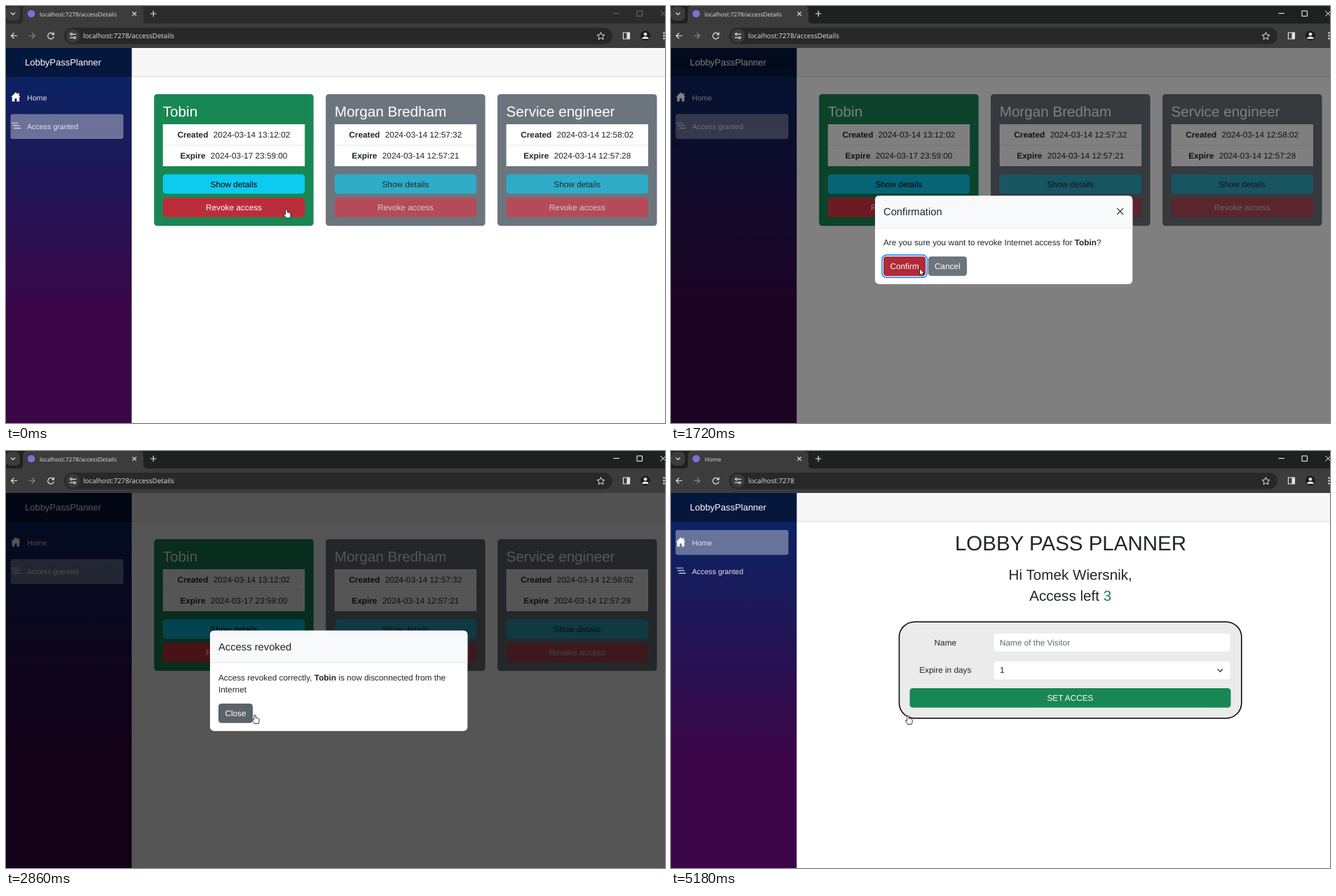
Recreate the animation shown at these times as an HTML page. Size 940 by 596 pixels, loop 5710 ms.

```html
<!DOCTYPE html>
<html lang="en">
<head>
<meta charset="utf-8">
<title>Access details</title>
<style>
  html, body { margin: 0; width: 100%; height: 100%; overflow: hidden; background: #fff; }
  svg { position: fixed; inset: 0; width: 100%; height: 100%; }
  text { font-family: "Liberation Sans", Arial, sans-serif; font-size: 11.8px; fill: #212529; text-rendering: geometricPrecision; white-space: pre; }
  .ui { font-family: "Open Sans", "Noto Sans", sans-serif; fill: #e8e8e8; }
  .mid { text-anchor: middle; }
  .b { font-weight: bold; }
</style>
</head>
<body>
<svg id="stage" viewBox="0 0 940 596"></svg>
<script>
const LOOP = 5710;
const GREEN = '#198754', RED = '#dc3545', GREY = '#6c757d';

// Markup helpers
const rect = (x, y, w, h, fill, r = 0, attrs = '') =>
  `<rect x="${x}" y="${y}" width="${w}" height="${h}" fill="${fill}" rx="${r}" ${attrs}/>`;
const text = (x, y, str, attrs = '', size = 11.8, fill = '#212529') =>
  `<text x="${x}" y="${y}" ${attrs} style="font-size:${size}px;fill:${fill}">${str}</text>`;
const line = (d, color, width = 1.2, attrs = '') =>
  `<path d="${d}" fill="none" stroke="${color}" stroke-width="${width}" ${attrs}/>`;
const group = (id, body, attrs = '') => `<g id="${id}" ${attrs}>${body}</g>`;
const bold = str => `<tspan class="b">${str}</tspan>`;
const button = (x, y, w, label, fill, color = '#fff', over = '') =>
  rect(x, y, w, 27.8, fill, 4.4) + over + text(x + w / 2, y + 18.2, label, 'class="mid"', 11.8, color);

function browser() {
  const white = '#e3e3e3';
  const tab = (id, title, url) => group(id,
    text(48, 14.6, title, 'class="ui"', 8.26, white) +
    text(110, 46.3, url, 'class="ui"', 9.76, white));
  return rect(0, 0, 940, 60, '#2b2b2b', 0, 'id="titlebar"') +
    rect(0, 1, 20, 20, '#3c3c3c', 7) +
    line('M7 9.5l3 3 3-3', white) +
    '<path d="M19 25q5 0 5-5V6q0-6 6-6H190q6 0 6 6V20q0 5 5 5z" fill="#3c3c3c"/>' +
    '<circle cx="36" cy="11" r="5.3" fill="#7a70d8"/>' +
    line('M180.3 8.3l5.6 5.6m0-5.6l-5.6 5.6M206 11h8.4M210.2 6.8v8.4', white) +
    line('M866.5 10.5h8.5M900 7h7.5v7.5h-7.5zM933.5 7l7.5 7.5m0-7.5l-7.5 7.5', '#707070', 1, 'id="controls"') +
    rect(0, 25, 940, 35, '#3c3c3c') +
    rect(83, 31, 782, 23.5, '#282828', 11.75) +
    line('M16 42.5H7.5m4-4l-4 4 4 4M67.3 40a4.3 4.3 0 1 0 .9 3.6M68.3 37.5v3.3h-3.3', white) +
    line('M32.5 42.5H41m-4-4l4 4-4 4', '#8a8a8a') +
    '<circle cx="95.5" cy="42.7" r="9.7" fill="#3c3c3c"/>' +
    line('M91 40.3h1.5M95.5 40.3h4.7M91 45.2h4.7M98.7 45.2h1.5', white) +
    `<g fill="none" stroke="${white}" stroke-width="1.1"><circle cx="93.3" cy="40.3" r="1.4"/><circle cx="97.7" cy="45.2" r="1.4"/></g>` +
    line('M848.5 37.5l1.6 3.6 3.9.3-3 2.6.9 3.8-3.4-2-3.4 2 .9-3.8-3-2.6 3.9-.3z', white, 1) +
    line('M880.5 38h9v9h-9z', white) + rect(885.5, 38, 4, 9, white) +
    `<circle cx="912" cy="42.5" r="7" fill="#1c1c1c"/><circle cx="912" cy="40.3" r="2.4" fill="${white}"/>` +
    `<path d="M907.3 47q0-3.2 4.7-3.2t4.7 3.2z" fill="${white}"/>` +
    [38.5, 42.5, 46.5].map(y => `<circle cx="938.5" cy="${y}" r="1.2" fill="${white}"/>`).join('') +
    tab('tabDetails', 'localhost:7278/accessDetails', 'localhost:7278/accessDetails') +
    tab('tabHome', 'Home', 'localhost:7278');
}

const navMark = y => rect(6.5, y, 161, 35.5, 'rgba(255,255,255,.37)', 3);

function frame() {
  return rect(0, 60, 940, 536, '#fff') +
    rect(179, 60, 761, 41, '#f7f7f7') + rect(179, 100.5, 761, 1, '#d6d5d5') +
    rect(0, 60, 179.3, 536, 'url(#side)') + rect(0, 60, 179.3, 41.3, 'rgba(0,0,0,.4)') +
    text(27, 85.4, 'LobbyPassPlanner', '', 12.98, '#fff');
}

function navLabels() {
  return '<path d="M13.9 123.3L7.2 130H8.7V136.6H12.4V132.3H15.4V136.6H19.1V130H20.6L18.6 128V124.5H16.8V126.2z" fill="#fff"/>' +
    line('M7.6 167.2h10M9.4 170.9h10M11.2 174.6h10', '#e4e4e4', 1.1) +
    text(30, 134.6, 'Home', '', 10.62, '#e6e6e6') +
    text(30, 175.9, 'Access granted', '', 10.62, '#e6e6e6');
}

function card(x, name, created, expire, active) {
  const row = (y, label, date) =>
    text(x + 113.7, y, `${bold(label)}<tspan dx="7.4">${date}</tspan>`, 'class="mid"');
  const hover = active ? rect(x + 12.6, 274, 202.4, 27.8, '#bb2d3b', 4.4, 'id="revokeHover"') : '';
  return rect(x, 126, 227.5, 188.3, active ? GREEN : GREY, 4.5) +
    text(x + 12.6, 158, name, '', 20.65, '#fff') +
    rect(x + 12.6, 169, 202.4, 60, '#fff') + rect(x + 12.6, 198.6, 202.4, .8, '#dee2e6') +
    row(188, 'Created', created) + row(218, 'Expire', expire) +
    `<g opacity="${active ? 1 : .65}">` +
    button(x + 12.6, 240.4, 202.4, 'Show details', '#0dcaf0', '#000') +
    button(x + 12.6, 274, 202.4, 'Revoke access', RED, '#fff', hover) + '</g>';
}

const details = () => navMark(154.4) +
  card(211.2, 'Tobin', '2024-03-14 13:12:02', '2024-03-17 23:59:00', true) +
  card(456.1, 'Morgan Bredham', '2024-03-14 12:57:32', '2024-03-14 12:57:21') +
  card(701, 'Service engineer', '2024-03-14 12:58:02', '2024-03-14 12:57:28');

function homeForm() {
  const field = y => rect(460, y, 338, 27, '#fff', 4.4, 'stroke="#dee2e6" stroke-width=".75"');
  return text(570, 142, 'LOBBY PASS PLANNER', 'class="mid"', 29.5) +
    text(569.7, 184, 'Hi Tomek Wiersnik,', 'class="mid"', 20.65) +
    text(569.7, 214, `Access left <tspan fill="${GREEN}" style="fill:${GREEN}">3</tspan>`, 'class="mid"', 20.65) +
    rect(325.5, 244.2, 488.3, 137.8, '#ebebeb', 22, 'stroke="#000" stroke-width="1.5"') +
    text(391.3, 277.5, 'Name', 'class="mid"') + text(391.3, 317.3, 'Expire in days', 'class="mid"') +
    field(260) + text(469, 277.5, 'Name of the Visitor', '', 11.8, '#62696f') +
    field(300) + text(469, 317.3, '1') +
    line('M779.8 311.8l3.6 3.6 3.6-3.6', '#343a40', 1.4) +
    button(340.5, 339, 458, 'SET ACCES', GREEN);
}

function dialog(id, y, h, title, body) {
  return group(id,
    rect(291, y, 367.3, h, '#fff', 5.9) +
    `<path d="M291 ${y + 46}v-40.1q0-5.9 5.9-5.9h355.5q5.9 0 5.9 5.9v40.1z" fill="#f8f9fa"/>` +
    rect(291, y + 45.6, 367.3, .75, '#dee2e6') +
    text(303, y + 27.8, title, '', 14.75) + body);
}

const confirmBody =
  line('M636.3 289.2l8.8 8.8m0-8.8l-8.8 8.8', '#222', 1.1) +
  text(303, 342, `Are you sure you want to revoke Internet access for ${bold('Tobin')}?`) +
  group('ring', rect(300.2, 355.1, 66, 33.6, '#258cfb', 7) + rect(301.9, 356.8, 62.6, 30.2, '#fff', 5.5)) +
  button(303, 358, 60.2, 'Confirm', RED, '#fff', rect(303, 358, 60.2, 27.8, '#b02a37', 4.4, 'id="confirmHover"')) +
  button(366.8, 358, 55.3, 'Cancel', GREY);

const revokedBody =
  text(303, 333.2, `Access revoked correctly, ${bold('Tobin')} is now disconnected from the`) +
  text(303, 350.9, 'Internet') +
  button(303, 366.7, 49, 'Close', '#5c636a');

const shade = id => rect(0, 60, 940, 536, '#000', 0, `id="${id}"`);
const loader = group('loader',
  rect(0, 60, 940, 536, 'rgba(0,0,0,.5)') +
  line('M7.35 7.35A10.4 10.4 0 1 1 7.35 -7.35', '#fff', 2.95, 'id="spinner"') +
  text(474.6, 352, 'Loading data, please wait ...', 'class="mid"', 11.8, '#fff'));

const pointer = d => `<path d="${d}" fill="#fff" stroke="#000" stroke-width=".8" stroke-linejoin="round"/>`;
const cursors =
  group('arrow', pointer('M0 0V9.6L2.2 7.6 3.7 11 5.2 10.3 3.8 7.1H6.8Z')) +
  group('hand', pointer('M-1.3 1Q0-.4 1.3 1V4.6Q2.3 4 3 4.8 4.2 4.3 4.8 5.4 6 5.3 6 6.6V9Q6 11 5 12.6H-.8Q-1.6 10.5-3.7 8.2-4 6.6-2.6 6.8L-1.3 7.8Z'));

document.getElementById('stage').innerHTML =
  '<defs><linearGradient id="side" x1="0" y1="0" x2="0" y2="1"><stop stop-color="#052767"/>' +
  '<stop offset=".7" stop-color="#3a0647"/></linearGradient></defs>' +
  browser() + frame() +
  group('details', details()) +
  group('home', navMark(113) + group('form', homeForm())) +
  navLabels() + shade('shade1') + shade('shade2') +
  dialog('confirm', 271.2, 126.2, 'Confirmation', confirmBody) +
  dialog('revoked', 262.4, 143.6, 'Access revoked', revokedBody) +
  loader + cursors;

// Timing helpers
const $ = id => document.getElementById(id);
const ramp = (t, start, len) => Math.min(1, Math.max(0, (t - start) / len));
const smooth = p => p * p * (3 - 2 * p);
const show = (id, on) => $(id).setAttribute('display', on ? 'inline' : 'none');
const fade = (id, a) => { $(id).setAttribute('opacity', a); show(id, a > 0); };
const move = (id, x, y, more = '') => $(id).setAttribute('transform', `translate(${x} ${y})${more}`);

// CSS ease-out, solved by bisection
function easeOut(p) {
  let lo = 0, hi = 1;
  for (let i = 0; i < 18; i++) {
    const s = (lo + hi) / 2;
    if (1.74 * s * s * (1 - s) + s ** 3 < p) lo = s; else hi = s;
  }
  return lo * lo * (3 - 2 * lo);
}

function slide(id, t, open, close) {
  fade(id, ramp(t, open, 150) * (1 - ramp(t, close, 150)));
  move(id, 0, -37 * (1 - easeOut(ramp(t, open, 300)) + easeOut(ramp(t, close, 300))));
}

function render(t) {
  const focused = t >= 90, atHome = t >= 4530;
  $('titlebar').setAttribute('fill', focused ? '#1f2020' : '#2b2b2b');
  $('controls').setAttribute('stroke', focused ? '#fff' : '#707070');
  show('tabDetails', !atHome);
  show('details', !atHome);
  show('tabHome', atHome);
  show('home', atHome);
  show('form', t >= 5180);

  fade('revokeHover', 1 - ramp(t, 200, 150));
  fade('confirmHover', ramp(t, 1130, 150));
  fade('ring', ramp(t, 1340, 150));

  fade('shade1', .5 * (ramp(t, 200, 150) - ramp(t, 2810, 150)));
  fade('shade2', atHome ? 0 : .5 * ramp(t, 2510, 150));
  slide('confirm', t, 350, 2510);
  slide('revoked', t, 2660, 4230);

  show('loader', (t >= 1760 && t < 2510) || (atHome && t < 5180));
  move('spinner', 474.6, 323.6, ` rotate(${(t - 4620) * 360 / 750})`);

  const arrow = t >= 200 && t < 1920;
  const down = smooth(ramp(t, 730, 560)), left = smooth(ramp(t, 3570, 380));
  show('arrow', arrow);
  show('hand', !arrow);
  move('arrow', 399.4 - 44.8 * down, 290.2 + 85 * down);
  move('hand', 400 - 45 * down - 16.8 * left, 290.4 + 86.6 * down + .9 * left);
}

const tick = () => {
  render(performance.now() % LOOP);
  requestAnimationFrame(tick);
};
tick();
</script>
</body>
</html>
```
